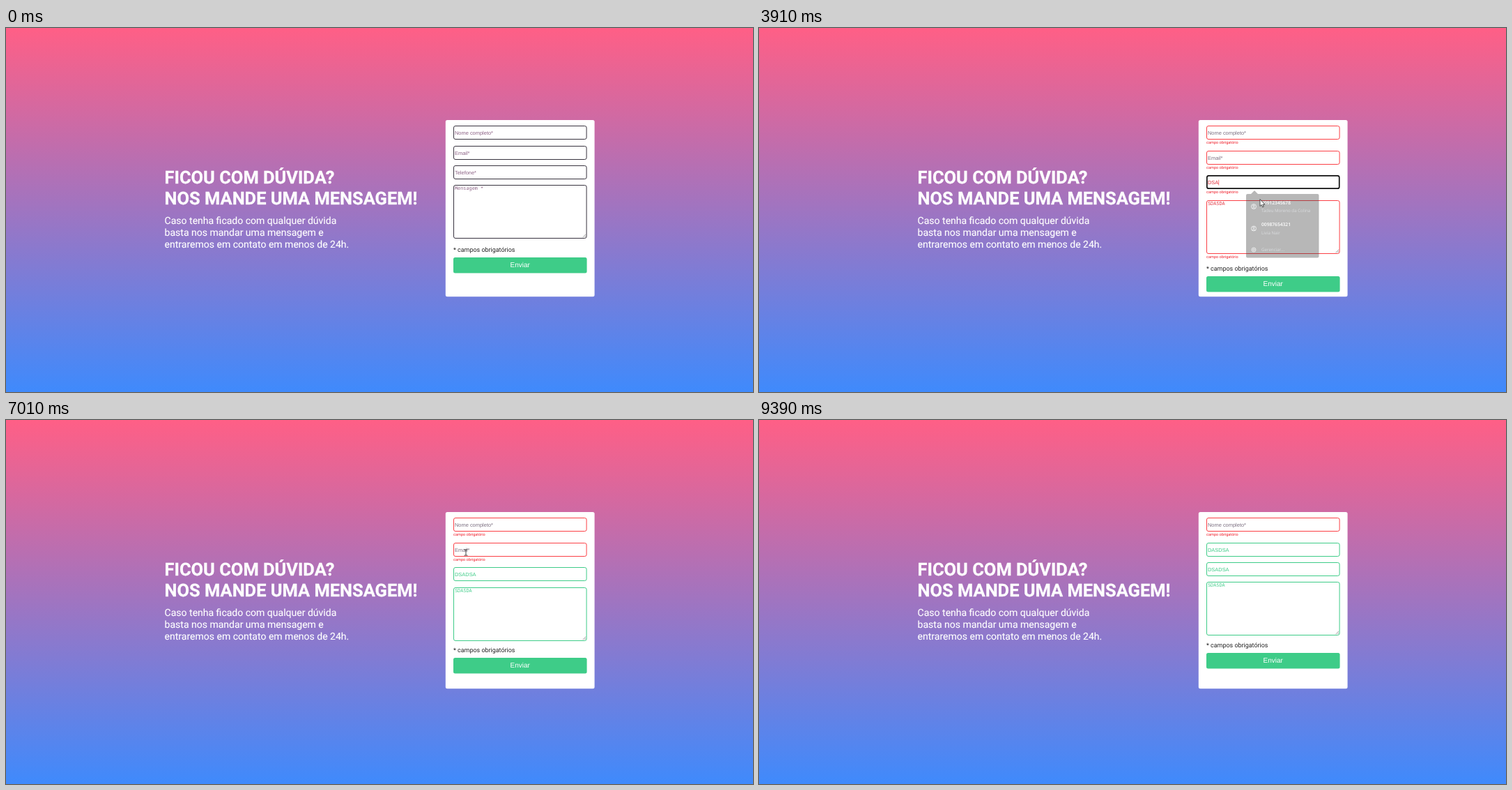
Recreate the animation shown at these times as an HTML page. Size 1072 by 522 pixels, loop 9990 ms.

```html
<!DOCTYPE html>
<html lang="pt-BR">
<head>
<meta charset="utf-8">
<title>Formulário de contato</title>
<style>
html, body { margin: 0; width: 100%; height: 100%; overflow: hidden; }
svg { display: block; width: 1072px; height: 522px; text-rendering: geometricPrecision; }
text { white-space: pre; }
.roboto { font-family: Roboto, sans-serif; }
.title { font-size: 25.45px; font-weight: 700; fill: #fff; stroke: #fff; stroke-width: .3px; }
.lead { font-size: 14.03px; fill: #fff; stroke: #fff; stroke-width: .15px; }
.note { font-size: 8.95px; fill: #222; }
.error { font-size: 5.6px; fill: #f0202c; }
.input { font: 7.44px "Liberation Sans", Arial, sans-serif; }
.mono { font: 6.85px "Noto Sans Mono", monospace; }
.send { font: 10.04px "Liberation Sans", Arial, sans-serif; fill: #fff; text-anchor: middle; }
.popup { font-family: "Open Sans", sans-serif; font-size: 6.2px; fill: #9aa0a6; }
.popup .main { font-size: 6.7px; font-weight: 600; fill: #fff; }
</style>
</head>
<body>
<svg viewBox="0 0 1072 522">
  <defs>
    <linearGradient id="sky" x2="0" y2="1">
      <stop stop-color="#ff5f86"/>
      <stop offset="1" stop-color="#3f8afc"/>
    </linearGradient>
  </defs>
  <rect width="1072" height="522" fill="url(#sky)"/>
  <g class="roboto title">
    <text x="227.5" y="223">FICOU COM DÚVIDA?</text>
    <text x="227.5" y="253.2">NOS MANDE UMA MENSAGEM!</text>
  </g>
  <g class="roboto lead">
    <text x="227.6" y="281">Caso tenha ficado com qualquer dúvida</text>
    <text x="227.6" y="298">basta nos mandar uma mensagem e</text>
    <text x="227.6" y="315">entraremos em contato em menos de 24h.</text>
  </g>
  <rect x="630.8" y="132" width="213.8" height="253.2" rx="2.5" fill="#fff"/>
  <g id="form"></g>
  <g id="popup" class="popup">
    <path d="M701 238h5l5-5 5 5h85.500a2 2 0 0 1 2 2v87.500a2 2 0 0 1-2 2h-100.500a2 2 0 0 1-2-2v-87.500a2 2 0 0 1 2-2z" fill="#3b3b3b"/>
    <text class="main" x="721" y="252.600">00912345678</text>
    <text x="721" y="264">Tadeu Moreno da Colina</text>
    <text class="main" x="721" y="284">00987654321</text>
    <text x="721" y="295.500">Livia Nair</text>
    <text x="721" y="320.300">Gerenciar...</text>
    <g fill="none" stroke="#e8eaed" stroke-width=".8">
      <path id="person" d="M706.500 256a3.500 3.500 0 1 0 7 0a3.500 3.500 0 1 0-7 0M708.800 255a1.200 1.200 0 1 0 2.400 0a1.200 1.200 0 1 0-2.400 0M707.700 258.500q2.300-2 4.600 0"/>
      <use href="#person" y="31.500"/>
      <circle cx="710" cy="318" r="3"/>
      <circle cx="710" cy="318" r="1.300"/>
    </g>
  </g>
  <g id="cursor" stroke-linejoin="round" stroke-linecap="round">
    <path id="arrow" d="M0 0V9.500L2.200 7.500L3.700 10.800L5.300 10.100L3.900 7H6.800Z" fill="#fff" stroke="#222" stroke-width=".75"/>
    <path id="hand" d="M-1.200 7.800V1.300A1.200 1.200 0 0 1 1.200 1.300V4.700Q2 4.200 2.700 5Q3.600 4.600 4.200 5.500Q5.500 5.300 5.600 6.700V9Q5.500 10.800 4.800 12.600H-.4Q-1 11-3.500 8.300Q-4 7.200-2.800 6.900Q-2 7-1.200 7.800M1.200 4.700V7M2.700 5V7M4.200 5.500V7.200" fill="#fff" stroke="#222" stroke-width=".8"/>
    <path id="beam" d="M-2 -4.200Q0-4.300 0-3.500Q0-4.300 2-4.200M0-3.500V3.500M-2 4.200Q0 4.300 0 3.500Q0 4.300 2 4.200" fill="none" stroke="#222" stroke-width=".85"/>
  </g>
</svg>
<script>
const LOOP = 9990, ENTER = 310, LEAVE = 9390;
const SUBMIT = 1480, NEVER = Infinity;
const LEFT = 642, WIDTH = 191.6, BUTTON_HEIGHT = 22.5, ERROR_HEIGHT = 7.35;
const RED = '#fb4046', GREEN = '#3ecc88';
const $ = id => document.getElementById(id);

const fields = [
  { hint: 'Nome completo*', fixed: NEVER, focus: [NEVER, NEVER], value: '', keys: NEVER },
  { hint: 'Email*', fixed: 8100, focus: [7100, 8100], value: 'DASDSA', keys: 7160 },
  { hint: 'Telefone*', fixed: 4710, focus: [3570, 4710], value: 'DSADSA', keys: 3770 },
  { hint: 'Mensagem *', fixed: 4710, focus: [2290, 3570], value: 'SDASDA', keys: 2690, first: 2620, area: true },
];

// Each move: first change, last change, number of steps, way points
const moves = [
  [310, 1210, 14, [1007, 498], [828, 350], [756, 291], [753, 345]],
  [1620, 2090, 8, [753, 345], [719, 302]],
  [3090, 3370, 5, [719, 302], [719, 230]],
  [3840, 3910, 2, [719, 230], [719, 246]],
  [4110, 4510, 7, [719, 246], [686, 356.8]],
  [5510, 5510, 1, [686, 356.8], [686, 342]],
  [5580, 5860, 5, [686, 342], [669, 213]],
  [6060, 7010, 13, [669, 213], [671, 200], [652, 190], [660, 190]],
  [7360, 7630, 5, [660, 190], [663.5, 362]],
  [7690, 7690, 1, [663.5, 362], [664, 371]],
  [7890, 8030, 3, [664, 371], [676, 350]],
  [8440, 9390, 15, [676, 350], [712, 231], [838, 367], [964, 502]],
];

function cursorAt(t) {
  const [start, end, steps, ...points] = moves.filter(m => t >= m[0]).pop() || moves[0];
  const step = end > start ? Math.floor((t - start) / (end - start) * (steps - 1) + 1e-6) + 1 : 1;
  const along = Math.max(0, Math.min(1, step / steps)) * (points.length - 1);
  const i = Math.min(Math.floor(along), points.length - 2);
  return [0, 1].map(k => points[i][k] + (points[i + 1][k] - points[i][k]) * (along - i));
}

function typed(field, t) {
  if (t < (field.first ?? field.keys)) return '';
  return field.value.slice(0, Math.max(1, Math.floor((t - field.keys) / 66) + 1));
}

function layout(t) {
  let y = 140.4;
  const boxes = fields.map(field => {
    const height = field.area ? 77 : 20;
    const failed = t >= SUBMIT && t < field.fixed;
    const box = { field, y: Math.round(y), height, failed, passed: t >= field.fixed,
      focused: t >= field.focus[0] && t < field.focus[1] };
    y += (field.area ? height : 28.15) + (failed ? ERROR_HEIGHT : 0);
    return box;
  });
  return { boxes, button: Math.round(y + (t < SUBMIT ? 27.2 : 24.8)) };
}

function drawField({ field, y, height, failed, passed, focused }, t) {
  const value = typed(field, t);
  const state = passed ? GREEN : failed ? RED : '#38333f';
  const line = focused ? 1.7 : 1;
  const color = value ? (passed ? GREEN : '#e0303c') : failed ? '#7c6f80' : '#8c6285';
  const base = y + (field.area ? 7.4 : 13);
  const caretX = 644 + [...value].reduce((w, c) => w + (field.area ? 4.11 : c === 'D' ? 5.37 : 4.96), 0);
  const bottom = y + height;
  let out = `<rect x="${LEFT + line / 2}" y="${y + line / 2}" width="${WIDTH - line}" height="${height - line}" rx="2.5"
    fill="#fff" stroke="${focused ? '#101010' : state}" stroke-width="${line}"/>
    <text class="${field.area ? 'mono' : 'input'}" x="644" y="${base}" fill="${color}">${value || field.hint}</text>`;
  if (focused) out += `<path d="M${caretX + .4} ${base - 6.3}v7.8" stroke="${value ? RED : '#333'}" stroke-width=".7"/>`;
  if (field.area) out += `<path d="M827.6 ${bottom - 1.8}l4.500-4.500M830 ${bottom - 1.8}l2.100-2.100" stroke="#777" stroke-width=".7"/>`;
  if (failed) out += `<text class="roboto error" x="${LEFT}" y="${bottom + 5.8}">campo obrigatório</text>`;
  return out;
}

function popupOpacity(t) {
  if (t < 3570 || t >= 3980) return 0;
  return t < 3640 ? .5 : t < 3840 ? 1 : t < 3910 ? .7 : .36;
}

function cursorShape(x, y, { boxes, button }, popup) {
  if (popup && x > 699 && x < 803 && y > 238 && y < 329) return 'arrow';
  if (x < LEFT || x > LEFT + WIDTH) return 'arrow';
  if (y >= button && y <= button + BUTTON_HEIGHT) return 'hand';
  return boxes.some(b => y >= b.y && y <= b.y + b.height) ? 'beam' : 'arrow';
}

let shown = '';
function render(t) {
  const view = layout(t);
  const form = view.boxes.map(box => drawField(box, t)).join('') +
    `<text class="roboto note" x="${LEFT}" y="${view.button - 8}">* campos obrigatórios</text>
    <rect x="${LEFT}" y="${view.button}" width="${WIDTH}" height="${BUTTON_HEIGHT}" rx="2.5" fill="${GREEN}"/>
    <text class="send" x="737.7" y="${view.button + 14.2}">Enviar</text>`;
  if (form !== shown) $('form').innerHTML = shown = form;

  const popup = popupOpacity(t);
  $('popup').setAttribute('opacity', popup);

  const [x, y] = cursorAt(t);
  const shape = cursorShape(x, y, view, popup);
  $('cursor').setAttribute('transform', `translate(${x} ${y})`);
  $('cursor').setAttribute('visibility', t >= ENTER && t < LEAVE ? 'visible' : 'hidden');
  for (const id of ['arrow', 'hand', 'beam']) $(id).setAttribute('display', id === shape ? 'inline' : 'none');
}

const began = performance.now();
function tick() {
  render((performance.now() - began) % LOOP);
  requestAnimationFrame(tick);
}
tick();
</script>
</body>
</html>
```
